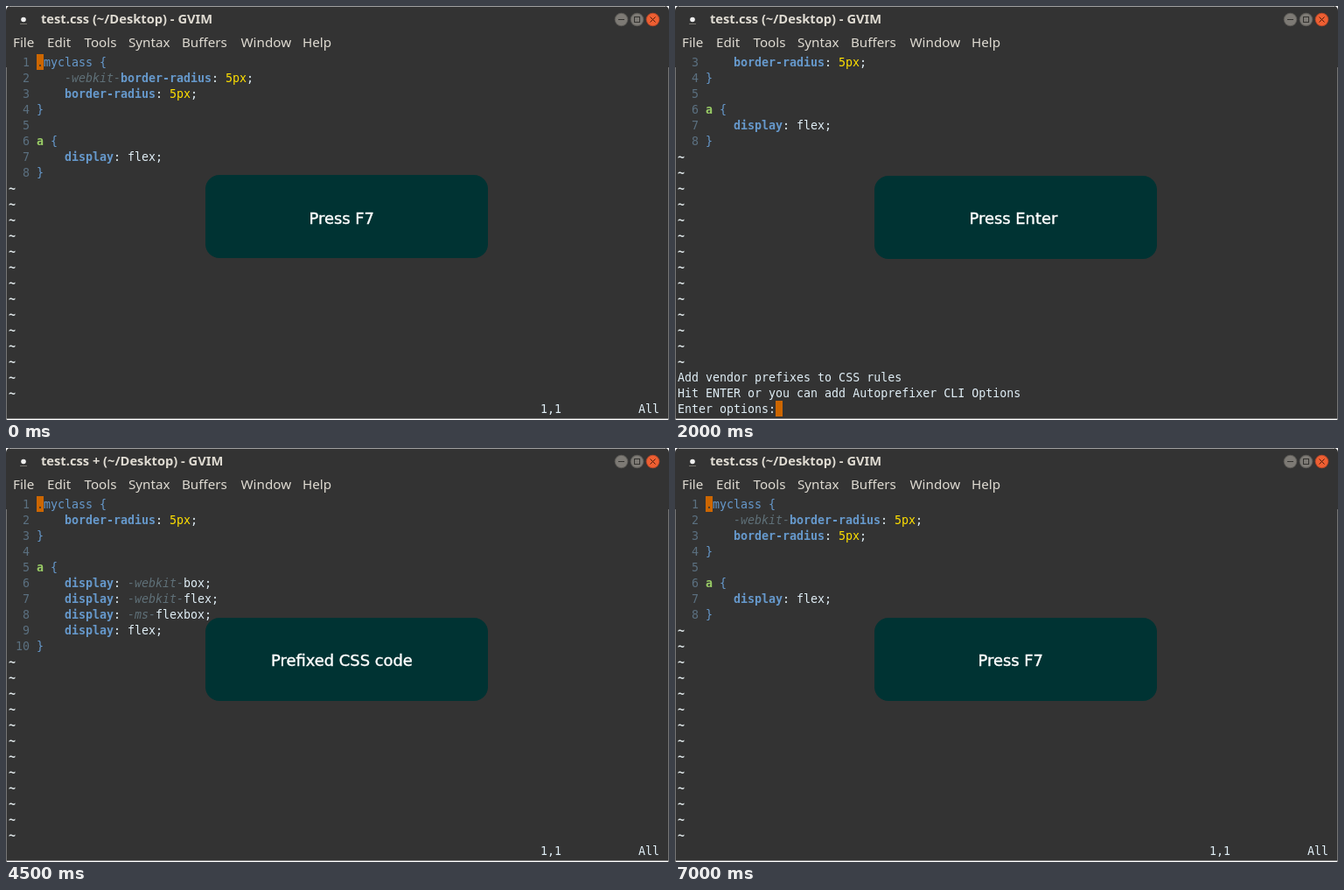
An HTML page with a canvas for the animation above (8 s loop, 758x473 px).

```html
<!DOCTYPE html>
<html lang="en">
<head>
<meta charset="utf-8">
<title>Prefixing CSS in an editor</title>
<style>
  html, body { margin: 0; width: 100%; height: 100%; overflow: hidden; background: #333; }
  canvas { display: block; }
</style>
</head>
<body>
<canvas id="stage" width="758" height="473"></canvas>
<script>
const ctx = document.getElementById('stage').getContext('2d');
const W = 758, H = 473, LOOP = 8000;
const GRID = { x: 3, y: 55, w: 8, h: 18, baseline: 14 };
const MONO = '13.3px "DejaVu Sans Mono", monospace';
const UI = '"Noto Sans", "Open Sans", sans-serif';

const STYLES = {
  plain: ['', '#e0eef6'],
  number: ['', '#5b7080'],
  brace: ['', '#6699cc'],
  prefix: ['italic ', '#5f7078'],
  property: ['bold ', '#6699cc'],
  value: ['', '#ffe000'],
  tag: ['bold ', '#99cc66'],
  tilde: ['bold ', '#e0e8ea'],
  covered: ['', '#333333']
};

// The first rule that matches at the current position wins.
const RULES = [
  ['prefix', /-(?:webkit|ms)-/y],
  ['property', /[a-z-]+(?=:)/y],
  ['value', /\d+px/y],
  ['tag', /a(?= \{)/y],
  ['brace', /myclass|[{}]/y],
  ['plain', /[a-z]+|[:;]/y]
];

const BEFORE = [
  '.myclass {', '    -webkit-border-radius: 5px;', '    border-radius: 5px;', '}',
  '', 'a {', '    display: flex;', '}'
];
const AFTER = [
  '.myclass {', '    border-radius: 5px;', '}', '', 'a {',
  '    display: -webkit-box;', '    display: -webkit-flex;',
  '    display: -ms-flexbox;', '    display: flex;', '}'
];
const PROMPT = [
  'Add vendor prefixes to CSS rules',
  'Hit ENTER or you can add Autoprefixer CLI Options',
  'Enter options:'
];

const press = { title: 'test.css', lines: BEFORE, label: 'Press F7', labelX: 346.5 };
const SCENES = [
  { ...press, start: 0, boxY: 193 },
  { ...press, start: 500, boxY: 194, first: 2, prompt: PROMPT, label: 'Press Enter', labelX: 336.5 },
  { start: 3000, boxY: 194, title: 'test.css +', lines: AFTER, label: 'Prefixed CSS code', labelX: 303 },
  { ...press, start: 5500, boxY: 194 }
];

function text(str, x, y, font, color) {
  ctx.font = font;
  ctx.fillStyle = color;
  ctx.fillText(str, x, y);
}

function rect(x, y, w, h, color) {
  ctx.fillStyle = color;
  ctx.fillRect(x, y, w, h);
}

function disc(x, y, r, color) {
  ctx.fillStyle = color;
  ctx.beginPath();
  ctx.arc(x, y, r, 0, Math.PI * 2);
  ctx.fill();
}

function stroke(color, ...lines) {
  ctx.strokeStyle = color;
  ctx.lineWidth = 1;
  ctx.beginPath();
  for (const [x1, y1, x2, y2] of lines) {
    ctx.moveTo(x1, y1);
    ctx.lineTo(x2, y2);
  }
  ctx.stroke();
}

function button(x, rim, fill) {
  disc(x, 15.5, 7.8, rim);
  disc(x, 15.5, 6.8, fill);
}

function put(str, col, row, style = 'plain') {
  const [weight, color] = STYLES[style];
  text(str, GRID.x + col * GRID.w, GRID.y + row * GRID.h + GRID.baseline, weight + MONO, color);
}

function cursor(col, row) {
  rect(GRID.x + col * GRID.w, GRID.y + row * GRID.h, GRID.w, GRID.h, '#cc6600');
}

function putCode(line, row) {
  let pos = 0;
  while (pos < line.length) {
    let length = 1;
    for (const [style, rule] of RULES) {
      rule.lastIndex = pos;
      const match = rule.exec(line);
      if (match) {
        put(match[0], 4 + pos, row, style);
        length = match[0].length;
        break;
      }
    }
    pos += length;
  }
}

function drawWindow(title) {
  rect(0, 0, W, H, '#ffffff');
  ctx.fillStyle = '#333333';
  ctx.beginPath();
  ctx.roundRect(0, 0, W, H - 1, [5, 5, 0, 0]);
  ctx.fill();
  rect(4, 0, W - 8, 1, '#a0a0a0');
  rect(0, 70, 1, H - 70, '#777777');
  rect(W - 1, 70, 1, H - 70, '#777777');
  rect(0, H - 2, W, 1, '#888888');

  disc(20, 15.5, 2.8, '#eeeeee');
  stroke('#77756f', [16, 20.5, 24, 20.5]);
  text(title + ' (~/Desktop) - GVIM', 40, 20, '600 14.7px ' + UI, '#dfdbd2');

  button(703.5, '#5c5a56', '#7d7a75');
  button(721.5, '#5c5a56', '#7d7a75');
  button(739.5, '#b5482a', '#ee5f32');
  stroke('#33322f', [700, 15.5, 707, 15.5]);
  ctx.strokeRect(718.5, 12.5, 6, 6);
  stroke('#4a1c0c', [736.5, 12.5, 742.5, 18.5], [742.5, 12.5, 736.5, 18.5]);

  const menu = { File: 8, Edit: 47, Tools: 89.5, Syntax: 140, Buffers: 201, Window: 268.5, Help: 339 };
  for (const [name, x] of Object.entries(menu)) text(name, x, 47, '15.2px ' + UI, '#dfdbd2');
}

function drawEditor({ lines, first = 0, prompt }) {
  const shown = lines.slice(first);
  shown.forEach((line, row) => {
    put(String(row + first + 1).padStart(3), 0, row, 'number');
    putCode(line, row);
  });
  const end = prompt ? 20 : 22;
  for (let row = shown.length; row < end; row++) put('~', 0, row, 'tilde');

  if (prompt) {
    prompt.forEach((line, i) => put(line, 0, end + i));
    cursor(prompt.at(-1).length, 22);
  } else {
    cursor(4, 0);
    put(lines[0][0], 4, 0, 'covered');
    put('1,1', 76, 22);
    put('All', 90, 22);
  }
}

function drawBanner({ label, labelX, boxY }) {
  ctx.fillStyle = '#003333';
  ctx.beginPath();
  ctx.roundRect(228, boxY, 323, 95, 16);
  ctx.fill();
  text(label, labelX, 249, '17.9px "DejaVu Sans", sans-serif', '#ffffff');
  ctx.strokeStyle = '#ffffff';
  ctx.lineWidth = 0.4;
  ctx.strokeText(label, labelX, 249);
}

function frame() {
  const time = performance.now() % LOOP;
  const scene = SCENES.findLast(s => s.start <= time);
  drawWindow(scene.title);
  drawEditor(scene);
  drawBanner(scene);
  requestAnimationFrame(frame);
}

frame();
</script>
</body>
</html>
```
